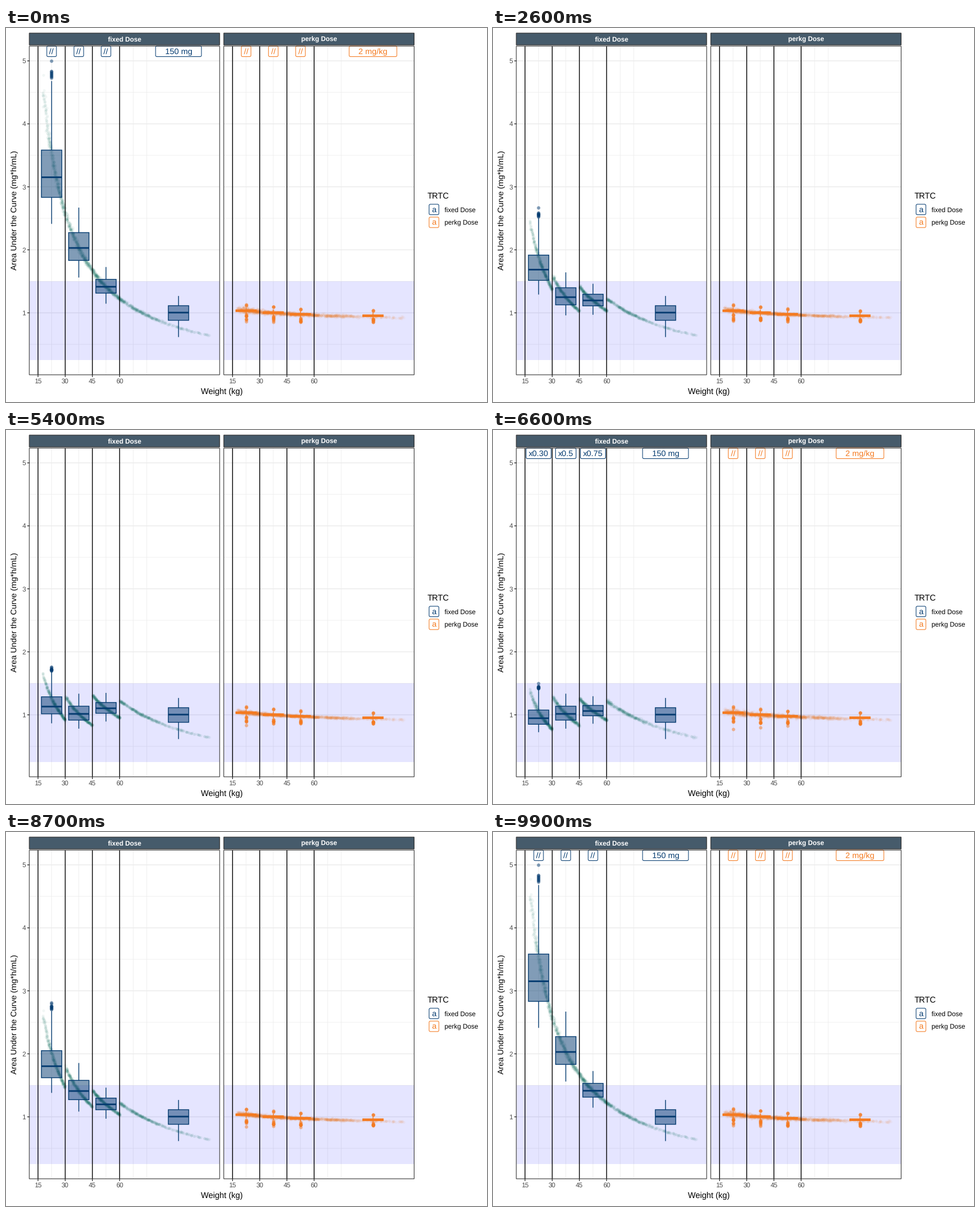
These frames come from a looping animation (849x660 px, 10 s). A matplotlib script:

```python
import numpy as np
import matplotlib.pyplot as plt
from matplotlib.animation import FuncAnimation
from matplotlib.patches import FancyBboxPatch, Rectangle

W, H, DPI = 849, 660, 100
PX = 72 / DPI  # points per pixel
plt.rcParams.update({"font.family": "Liberation Sans", "text.hinting": "none"})

NAVY, ORANGE, GREEN = "#043B70", "#F47A20", "#0A6E5C"
SLATE, GREY20, GREY30, GRID = "#465B6B", "#333333", "#4D4D4D", "#EBEBEB"
TOP, BOTTOM, WIDTH, SHIFT = 32, 612, 336, 343.3
CENTRES = [22.5, 37.5, 52.5, 92.5]

# Dose multipliers per weight band in the three states
FACTORS = np.array([[1, 1, 1, 1], [0.396, 0.5, 0.8, 1], [0.3, 0.5, 0.75, 1]])
MULTIPLIERS = [["//"] * 3, ["x0.4", "x0.5", "x0.8"], ["x0.30", "x0.5", "x0.75"]]
# Tween start frame, end frame, from state, to state
TWEENS = [(11, 33, 0, 1), (45, 66, 1, 2), (78, 99, 2, 0)]

# Body weight at the quarters of each band
QUARTERS = np.array([[30, 27.5, 24.9, 22.1, 17.8], np.linspace(45, 30, 5),
                     np.linspace(60, 45, 5), [107, 81.5, 72.2, 65.6, 60]])


def auc_fixed(weight):
    return 2.58 * (weight / 30) ** -1.075


def auc_perkg(weight):
    return auc_fixed(weight) * weight * 2 / 152


def px(weight):
    return 56.5 + 3.2 * (weight - 15)


def py(auc):
    return 502.6 - 111.15 * (auc - 1)


rng = np.random.default_rng(7)


def sample(quarters, n=350):
    """Draw weights from a smooth quantile curve through the quarters."""
    light_first = quarters if quarters[-1] < 20 else quarters[::-1]
    curve = np.polyfit(np.linspace(0, 1, 5), light_first, 4)
    return np.polyval(curve, rng.uniform(0, 1.015, n))


def noise():
    return 1 + rng.normal(0, 0.1, (3, weights.size)) / np.sqrt(weights)


weights = np.concatenate([sample(q) for q in QUARTERS])
band = np.repeat(np.arange(4), weights.size // 4)
fixed_points = auc_fixed(weights) * FACTORS[:, band] * noise()
perkg_points = auc_perkg(weights) * noise()

# Low whisker, lower hinge, median, upper hinge, high whisker
five = auc_fixed(QUARTERS) * [0.935, 1, 1, 1, 1.035]
fixed_boxes = FACTORS[:, :, None] * five
medians = auc_perkg(QUARTERS[:, 2])
perkg_boxes = np.array([medians[:, None] + [-0.055, -0.014, 0, 0.014, 0.05]] * 3)

top_values = np.append(5, np.linspace(4.84, 4.73, 9))
fixed_outliers = [np.array([np.roll(top_values * f, turn)
                            for f, turn in zip(FACTORS[:, 0], (0, 0, 1))])]


def perkg_spread(median, span, strays):
    """Values just above and below a box, with one low stray per state."""
    rows = []
    for state, stray in enumerate(strays):
        above = median + 0.07 + 0.3 * span * rng.random(3)
        below = median - 0.05 - span * rng.random(9)
        below = np.roll(np.append(below, median - stray), state)
        rows.append(np.concatenate([above, below]))
    return np.array(rows)


perkg_outliers = [
    perkg_spread(m, span, strays) for m, span, strays in
    zip(medians, np.linspace(0.11, 0.05, 4),
        np.linspace([0.17, 0.16, 0.26], [0.1, 0.1, 0.1], 4))]

fig = plt.figure(figsize=(W / DPI, H / DPI), dpi=DPI, facecolor="white")
ax = fig.add_axes([0, 0, 1, 1])
ax.set_xlim(0, W)
ax.set_ylim(H, 0)
ax.axis("off")


def line(x, y, color, width, z):
    return ax.plot(x, y, color=color, lw=width * PX, zorder=z,
                   solid_capstyle="butt", snap=False)[0]


def rect(x0, y0, x1, y1, z, **style):
    return ax.add_patch(Rectangle((x0, y0), x1 - x0, y1 - y0, zorder=z,
                                  snap=False, **style))


def text(x, y, s, size, color="black", z=9, ha="center", **style):
    return ax.text(x, y, s, fontsize=size * PX, color=color, zorder=z,
                   ha=ha, va="baseline", **style)


def tag(x, y0, y1, half, color):
    return ax.add_patch(FancyBboxPatch(
        (x - half, y0), 2 * half, y1 - y0, fc="white", ec=color,
        boxstyle="round,pad=0,rounding_size=2.3", lw=1.05 * PX, zorder=7))


def dots(color, size, alpha, z):
    return ax.plot([], [], "o", color=color, ms=size * PX, mew=0,
                   alpha=alpha, zorder=z)[0]


class BoxPlot:
    def __init__(self, x, color):
        self.x = x
        self.whiskers = [line([x, x], [0, 0], color, 1.42, 5) for _ in "ab"]
        self.box = rect(x - 18, 0, x + 18, 1, 5, fc=(color, 0.5), ec=color,
                        lw=1.42 * PX)
        self.median = line([x - 18, x + 18], [0, 0], color, 2.84, 6)
        self.outliers = dots(color, 6, 0.5, 6)

    def update(self, stats, outliers):
        low, q1, mid, q3, high = py(stats)
        self.whiskers[0].set_ydata([low, q1])
        self.whiskers[1].set_ydata([q3, high])
        self.box.set_y(q3)
        self.box.set_height(q1 - q3)
        self.median.set_ydata([mid, mid])
        self.outliers.set_data(np.full(len(outliers), self.x), py(outliers))


class Panel:
    def __init__(self, dx, title, color, cloud_color, points, boxes, outliers,
                 labels):
        self.points, self.boxes, self.outliers = points, boxes, outliers
        x0 = 41.1 + dx
        x1 = x0 + WIDTH
        for v in np.arange(0.5, 5.1, 0.5):
            line([x0, x1], [py(v)] * 2, GRID, 1.42 if v % 1 == 0 else 0.71, 1)
        for w in (22.5, 37.5, 52.5, 67.5, 75):
            line([px(w) + dx] * 2, [TOP, BOTTOM], GRID, 0.75, 1)
        rect(x0, py(1.5), x1, py(0.25), 2, fc=(0, 0, 1, 0.1), lw=0)
        for w in (15, 30, 45, 60):
            x = px(w) + dx
            line([x, x], [TOP, BOTTOM], "black", 1.42, 4)
            line([x, x], [BOTTOM, BOTTOM + 4], GREY20, 1.4, 8)
            text(x, 626.5, str(w), 11.6, GREY30)
        rect(x0, TOP, x1, BOTTOM, 8, fc="none", ec=GREY20, lw=1.1 * PX)
        rect(x0, 9, x1, 30, 8, fc=SLATE, ec=GREY20, lw=1.2 * PX)
        text((x0 + x1) / 2, 23.7, title, 11.6, "white", weight="bold")

        self.cloud = dots(cloud_color, 5, 0.05, 3)
        self.cloud_x = px(weights) + dx
        self.plots = [BoxPlot(px(w) + dx, color) for w in CENTRES]
        self.tags = [[part for w, s in zip(CENTRES, row)
                      for part in self.label(px(w) + dx, s, color)]
                     for row in labels]

    def label(self, x, s, color):
        words = text(x, 46, s, 14.4, color, z=7.5)
        pad = 16.5 if "mg" in s else 4.5
        half = words.get_window_extent().width / 2 + pad
        return words, tag(x, 31.8, 50.5, half, color)

    def update(self, a, b, e, held):
        def mix(states):
            return states[a] * (1 - e) + states[b] * e

        self.cloud.set_data(self.cloud_x, py(mix(self.points)))
        stats = mix(self.boxes)
        for i, plot in enumerate(self.plots):
            has_outliers = i < len(self.outliers)
            plot.update(stats[i], mix(self.outliers[i]) if has_outliers
                        else np.array([]))
        for state, parts in enumerate(self.tags):
            for part in parts:
                part.set_visible(held == state)


panels = [
    Panel(0, "fixed Dose", NAVY, GREEN, fixed_points, fixed_boxes,
          fixed_outliers, [row + ["150 mg"] for row in MULTIPLIERS]),
    Panel(SHIFT, "perkg Dose", ORANGE, ORANGE, perkg_points, perkg_boxes,
          perkg_outliers, [["//"] * 3 + ["2 mg/kg"]] * 3),
]

# Axes text and legend
for v in range(1, 6):
    line([37.5, 41.5], [py(v)] * 2, GREY20, 1.4, 8)
    text(35, py(v) + 4.1, str(v), 11.6, GREY30, ha="right")
text(381, 646, "Weight (kg)", 14.5)
text(18.7, 322, "Area Under the Curve (mg*h/mL)", 14.4, rotation=90,
     rotation_mode="anchor")
text(744, 301, "TRTC", 14.5, ha="left")
for y, name, color in ((320.3, "fixed Dose", NAVY), (343, "perkg Dose", ORANGE)):
    tag(755.4, y - 9.3, y + 9.2, 8.6, color)
    text(755.4, y + 4.3, "a", 14.4, color)
    text(774, y + 4.8, name, 11.6, ha="left")


def pose(k):
    """Return from state, to state, eased share and the held state, if any."""
    for start, end, a, b in TWEENS:
        if k <= start:
            return a, a, 0, a
        if k < end:
            u = (k - start) / (end - start)
            return a, b, (1 - np.cos(np.pi * u)) / 2, None
    return 0, 0, 0, 0


def draw(k):
    for panel in panels:
        panel.update(*pose(k))
    return []


anim = FuncAnimation(fig, draw, frames=100, interval=100, repeat=True,
                     repeat_delay=0, init_func=lambda: draw(0), blit=False)
plt.show()
```
